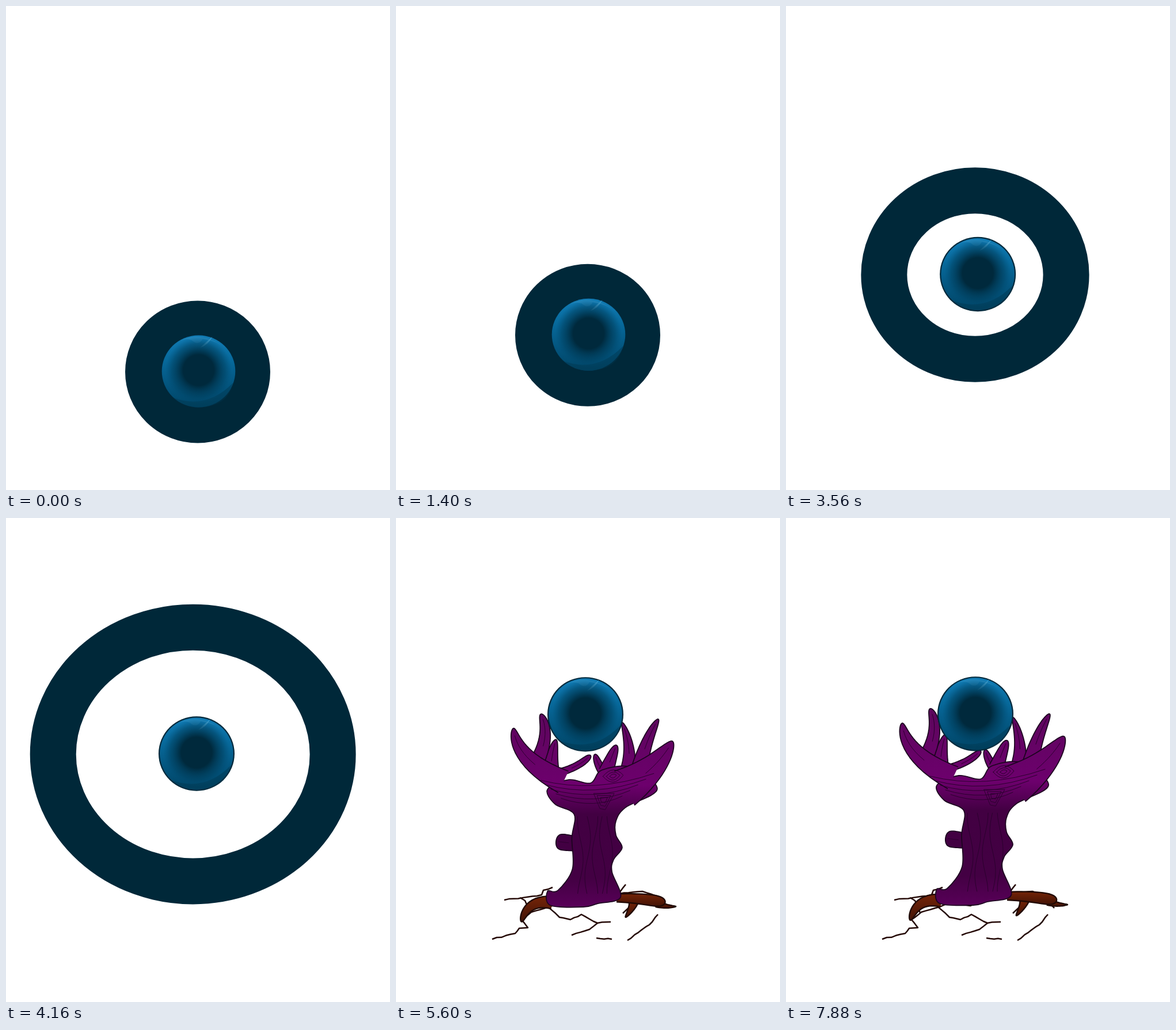
Animation, 667 px wide and 840 px high, one loop 8 s. Source, as an HTML page:

```html
<!DOCTYPE html>
<html lang="en">
<head>
<meta charset="utf-8">
<title>Orb and wooden hand</title>
<style>
html, body { margin: 0; width: 100%; height: 100%; overflow: hidden; background: #fff; }
svg { display: block; width: 100vw; height: 100vh; }
.wood { fill: url(#purple); stroke: #1d0420; stroke-width: 1.8; stroke-linejoin: round; }
.root { fill: url(#bark); stroke: #210a04; stroke-width: 2.4; stroke-linejoin: round; }
.grain { fill: none; stroke: #2b002e; stroke-width: 1; stroke-linecap: round; }
.crack { fill: none; stroke: #250a07; stroke-width: 2.5; stroke-linejoin: round; stroke-dasharray: 1; }
</style>
</head>
<body>
<svg viewBox="0 0 667 840" preserveAspectRatio="none">
  <defs>
    <linearGradient id="glass" x1="0" y1="0" x2="0" y2="1">
      <stop offset="0" stop-color="#117bb4"/>
      <stop offset=".35" stop-color="#07699b"/>
      <stop offset=".7" stop-color="#03547d"/>
      <stop offset="1" stop-color="#004566"/>
    </linearGradient>
    <radialGradient id="core">
      <stop offset=".46" stop-color="#00293c"/>
      <stop offset=".58" stop-color="#00344d" stop-opacity=".9"/>
      <stop offset=".8" stop-color="#00405f" stop-opacity=".55"/>
      <stop offset="1" stop-color="#004a70" stop-opacity="0"/>
    </radialGradient>
    <linearGradient id="purple" gradientUnits="userSpaceOnUse" x1="0" y1="330" x2="0" y2="672">
      <stop offset="0" stop-color="#5c065c"/>
      <stop offset=".37" stop-color="#6d006d"/>
      <stop offset=".52" stop-color="#420042"/>
      <stop offset=".85" stop-color="#430043"/>
      <stop offset="1" stop-color="#580058"/>
    </linearGradient>
    <linearGradient id="bark" x1="0" y1="0" x2="0" y2="1">
      <stop offset="0" stop-color="#742408"/>
      <stop offset="1" stop-color="#431305"/>
    </linearGradient>
  </defs>
  <ellipse id="ring" fill="none" stroke="#002839" stroke-width="80"/>
  <g id="cracks"></g>
  <g id="hand"></g>
  <g id="orb">
    <ellipse rx="66" ry="64.7" fill="#00283a"/>
    <ellipse rx="63.8" ry="62.6" fill="url(#glass)"/>
    <path d="M-38-49Q0-76 51-38Q30-54 7-56Q0-43-12-54Q-24-59-38-49Z" fill="#2689bd" opacity=".75"/>
    <path d="M24-60Q12-50 3-41Q16-45 24-60Z" fill="#3c99c8"/>
    <path d="M60 20Q51 62 0 62.5Q-27 62-44 46Q14 67 60 20Z" fill="#00364f" opacity=".45"/>
    <circle cy="-2" r="58" fill="url(#core)"/>
  </g>
</svg>
<script>
const LOOP = 8000, STEP = 120, LEAD = 40;
const [ring, cracks, hand, orb] =
  ['ring', 'cracks', 'hand', 'orb'].map(id => document.getElementById(id));
const clamp = v => Math.min(1, Math.max(0, v));
const lerp = (a, b, f) => a + (b - a) * f;
const parse = text => text.split(' ').map(pair => pair.split(',').map(Number));

function add(parent, className, d) {
  const path = document.createElementNS('http://www.w3.org/2000/svg', 'path');
  path.setAttribute('class', className);
  path.setAttribute('d', d);
  parent.append(path);
  return path;
}

let seed = 7;
function random() {
  seed = seed * 16807 % 2147483647;
  return seed / 2147483647;
}

// Closed Catmull-Rom curve through a few points.
function blob(text) {
  const pts = parse(text), n = pts.length;
  const handle = (i, sign) => pts[(i + n) % n].map((v, k) =>
    v + sign * (pts[(i + 1) % n][k] - pts[(i - 1 + n) % n][k]) / 6);
  let d = 'M' + pts[0];
  for (let i = 0; i < n; i++)
    d += `C${handle(i, 1)} ${handle((i + 1) % n, -1)} ${pts[(i + 1) % n]}`;
  return d + 'Z';
}

// Curved, tapering limb with a round tip; the base stays open so it blends in.
function limb(text, baseHalf, tipHalf, className = 'wood') {
  const [a, b, c] = parse(text), left = [], right = [], middle = [], n = 20;
  for (let i = 0; i <= n; i++) {
    const u = 1 - (1 - i / n) ** 2;
    const [x, y] = [0, 1].map(k => lerp(lerp(a[k], b[k], u), lerp(b[k], c[k], u), u));
    const [dx, dy] = [0, 1].map(k => lerp(b[k] - a[k], c[k] - b[k], u));
    const half = lerp(baseHalf, tipHalf, u) * Math.sqrt(1 - u ** 8) / Math.hypot(dx, dy);
    left.push([x - dy * half, y + dx * half]);
    right.unshift([x + dy * half, y - dx * half]);
    middle.push([x, y]);
  }
  add(hand, className, 'M' + left.concat(right).join(' '));
  if (className === 'wood') add(hand, 'grain', 'M' + middle.slice(4, 14).join(' '));
}

// Jagged line: short pieces between key points, each nudged at random.
function crack(text) {
  const pts = parse(text);
  let d = 'M' + pts[0];
  for (let i = 1; i < pts.length; i++) {
    const [a, b] = [pts[i - 1], pts[i]];
    const pieces = Math.ceil(Math.hypot(b[0] - a[0], b[1] - a[1]) / 9);
    for (let j = 1; j <= pieces; j++) {
      const nudge = j < pieces ? random() * 2 - 1 : 0;
      d += ` ${lerp(a[0], b[0], j / pieces)},${lerp(a[1], b[1], j / pieces) + nudge}`;
    }
  }
  const line = add(cracks, 'crack', d);
  line.setAttribute('pathLength', 1);
  return line;
}

const crackLines = [
  '167,731 207,721 214,712 229,711 218,697 235,684 291,667',
  '289,654 291,667 320,673 346,663',
  '188,663 253,654 256,646 272,641',
  '215,659 224,664 233,685',
  '264,675 284,693 303,697 322,688 350,703 373,701',
  '350,703 336,714 305,724',
  '313,642 347,634 388,652 428,648 458,658',
  '347,634 379,625',
  '399,636 378,662',
  '384,658 460,670 466,677',
  '415,667 394,686',
  '348,729 375,731',
  '402,733 440,706 455,688'
].map(crack);

limb('270,664 226,658 216,698', 11, 5, 'root');
limb('455,666 470,672 489,671', 6, 1, 'root');
limb('414,664 412,674 400,690', 8, 2, 'root');
limb('384,656 430,656 470,664', 7, 11, 'root');

// Fingers behind the palm, then the palm and trunk, then the two front fingers
limb('268,436 268,405 277,376', 15, 5);
limb('282,434 316,426 338,404', 6, 6);
limb('364,436 352,425 346,402', 9, 5);
limb('366,432 374,410 384,386', 13, 6);
limb('404,430 412,390 394,346', 13, 4);
limb('424,428 436,376 458,340', 14, 5);
limb('238,425 270,370 250,331', 13, 7);
limb('310,560 296,558 277,556', 13, 15);
add(hand, 'wood', blob('262,464 300,447 338,453 358,430 410,425 456,464 400,496 383,520 ' +
  '383,545 394,567 379,588 376,610 391,655 350,666 325,672 267,669 262,644 280,643 ' +
  '306,605 305,550 309,508 275,490'));
limb('290,451 206,411 202,356', 21, 7);
limb('398,462 456,428 483,379', 35, 9);

for (let i = 0; i < 5; i++) {
  let d = 'M';
  for (let y = 512; y < 655; y += 8)
    d += `${320 + i * 13 + 5 * Math.sin(y / 22 + i * 1.7)},${y} `;
  add(hand, 'grain', d);
  add(hand, 'grain', `M${250 + i * 9},${448 + i * 8}Q${345},${472 + i * 7} ${450 - i * 14},${436 + i * 10}`);
}
for (let r = 1; r <= 3; r++) {
  const w = r * 6, h = r * 3.6;
  add(hand, 'grain', `M${378 - w},441Q378,${441 - 2 * h} ${378 + w},439Q378,${441 + 2 * h} ${378 - w},441Z`);
  add(hand, 'grain', `M${362 - w},${482 - h}H${362 + w}L364,${482 + w}L${358 - r},${480 + w}Z`);
}

// Steady rise, a faster climb once free, then a gentle bob.
function orbAt(t) {
  const x = 334.5 - 5.5 * clamp((t - 3200) / 1500);
  const s = (t + LEAD) / 1000;
  if (t < 3560) return [x, 634 - 42.5 * s - 1.2 * s * s];
  if (t < 5000) return [x, lerp(465.5, 330, (t - 3560) / 1440)];
  return [x, 342 + 12 * Math.cos((t - 7670) / 757 * 2 * Math.PI)];
}

function drawRing(phase, t, [x, y]) {
  const rx = 126 * 1.254 ** phase * (1 + 0.25 * clamp((t - 3560) / 1080));
  const ry = rx * (0.98 - 0.02 * phase);
  ring.style.display = t < 4760 ? '' : 'none';
  ring.setAttribute('cx', x - 1.5 - 1.6 * phase);
  ring.setAttribute('cy', y + 1);
  ring.setAttribute('rx', rx - 40);
  ring.setAttribute('ry', ry - 40);
}

function draw(time) {
  const step = Math.floor((time + LEAD) / STEP), t = step * STEP - LEAD;
  const pos = orbAt(t);
  orb.setAttribute('transform', `translate(${pos})`);
  drawRing(step % 4, t, pos);

  const spread = clamp((t - 4160) / 480);
  cracks.style.display = spread > 0 ? '' : 'none';
  crackLines.forEach(line => line.setAttribute('stroke-dashoffset', 1 - spread));

  const grow = 1 - (1 - clamp((t - 5000) / 720)) ** 2;
  hand.style.display = grow > 0 ? '' : 'none';
  hand.setAttribute('transform',
    `translate(329 ${668 + 117 * (1 - grow)}) scale(${lerp(0.35, 1, grow)}) translate(-329 -668)`);
}

const start = performance.now();
function tick() {
  draw((performance.now() - start) % LOOP);
  requestAnimationFrame(tick);
}
tick();
</script>
</body>
</html>
```
